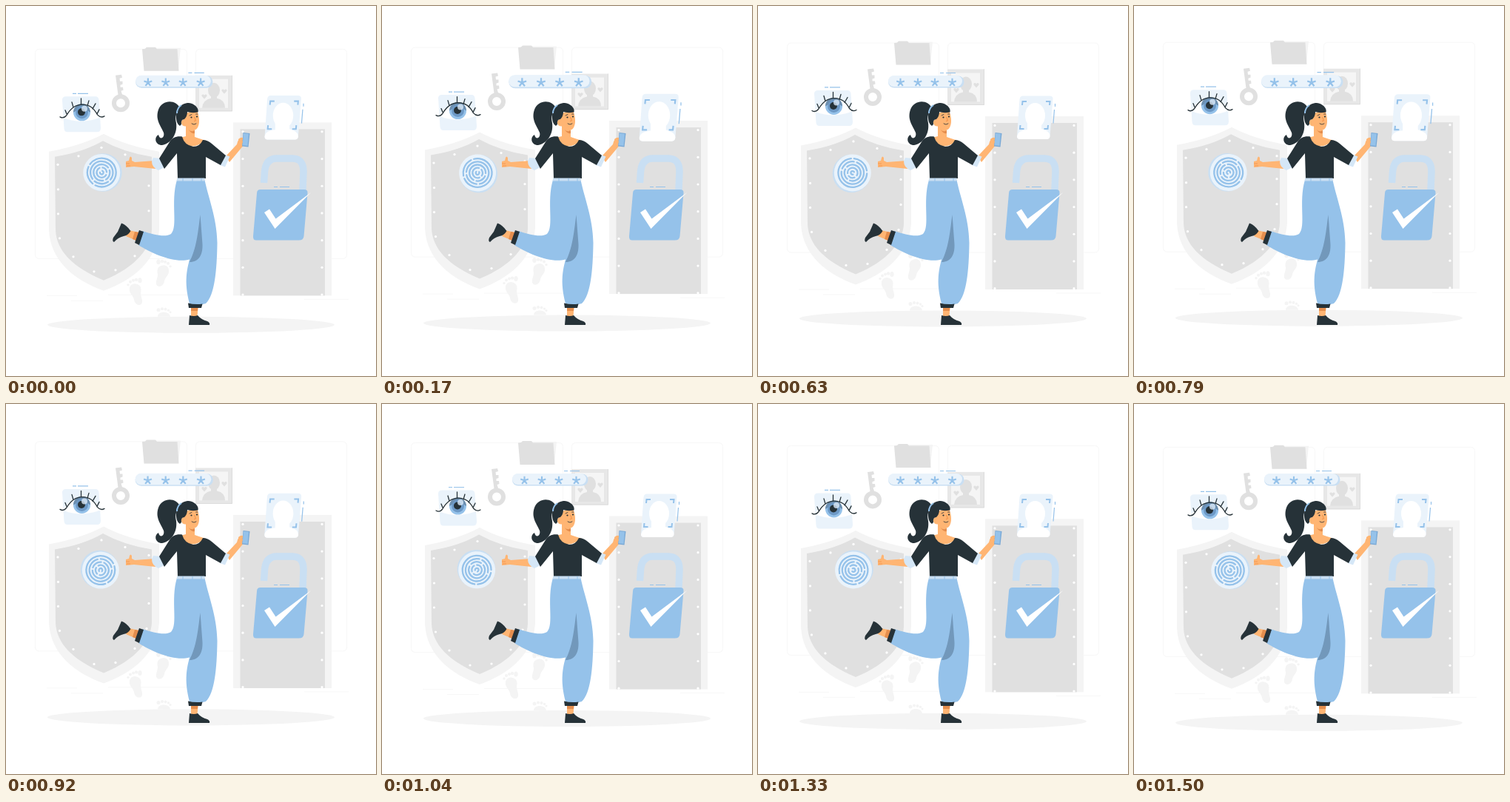
An HTML page for the animation above (1.54 s loop, 500 by 500 pixels).

```html
<!DOCTYPE html>
<html lang="en">
<head>
<meta charset="utf-8">
<title>Secure login</title>
<style>
  html, body { margin: 0; width: 100%; height: 100%; overflow: hidden; background: #fff; }
  svg { display: block; width: 100%; height: 100%; }
  .pale { fill: #f4f4f4; }
  .grey { fill: #e0e0e0; }
  .ice { fill: #eaf3fb; }
  .cuff { fill: #d5e7f7; }
  .sky { fill: #c9dff3; }
  .blue { fill: #95c2ea; }
  .dark { fill: #263238; }
  .skin { fill: #ffb573; }
  .white { fill: #fff; }
  .line { fill: none; stroke: #95c2ea; stroke-width: 1.2; }
  .ink { fill: none; stroke: #263238; stroke-linecap: round; }
</style>
</head>
<body>
<svg viewBox="0 0 500 500">
  <defs>
    <g id="foot">
      <path d="M-7 2C-8-5-3-9 3-7C9-5 9 0 8 5C8 10 12 16 9 20C5 23 0 20-1 14C-2 9-6 7-7 2Z"/>
      <circle cx="-9" cy="-6" r="1.7"/><circle cx="-6" cy="-10" r="2"/>
      <circle cx="-2" cy="-12" r="2"/><circle cx="2" cy="-13" r="2.2"/>
      <ellipse cx="7" cy="-12" rx="2.7" ry="3.5"/>
    </g>
    <path id="heart" d="M0 4L-3.5 0C-4-3-1-3 0-1C1-3 4-3 3.5 0Z"/>
    <path id="star" d="M0 0V-5.6M0 0L5.3-1.7M0 0L3.3 4.5M0 0L-3.3 4.5M0 0L-5.3-1.7"/>
  </defs>

  <g id="scene">
    <g fill="none" stroke="#f7f7f7">
      <rect x="39.5" y="58.5" width="205" height="283" rx="5"/>
      <rect x="256.5" y="58.5" width="204" height="283" rx="5"/>
      <path d="M55 391.5H96M88 398.5H131M138 390.5H250M403 396.5H463"/>
    </g>
    <ellipse class="pale" cx="250" cy="431" rx="194" ry="11"/>

    <path class="pale" d="M187 60L189 57H236L233 86Z"/>
    <path class="grey" d="M184 58.5L188 58L190 56H202L204 58.5H231.5L233.5 88H186.5Z"/>

    <circle cx="155" cy="131.5" r="9" fill="none" stroke="#e0e0e0" stroke-width="6"/>
    <path class="grey" d="M148 94L156 93L157 97L153.5 98L154 102L157.500 102V106L154.500 107V110L158 110L158.5 114L155.5 115L158 123L152 124Z"/>

    <rect x="256" y="94" width="50" height="48.5" fill="#e7e7e7"/>
    <rect x="261" y="99" width="39" height="39" fill="#f5f5f5"/>
    <path d="M305.5 94V142H256" fill="none" stroke="#dcdcdc"/>
    <g class="grey">
      <ellipse cx="281" cy="114" rx="8" ry="10"/>
      <path d="M277 120H285V125Q296 127 296 138H265Q266 127 277 125Z"/>
      <use href="#heart" x="268" y="122"/><use href="#heart" x="295" y="115"/>
    </g>

    <path class="pale" d="M58 197Q102 189 132 173Q162 189 207 197V303C204 345 171 371 132 385C93 371 60 345 58 303Z"/>
    <path class="grey" d="M66 204Q104 198 131 182.5Q159 198 197 204V303C196 327 176 353 132 371C89 353 68 330 67 303Z"/>
    <rect class="pale" x="307" y="157.5" width="133" height="234"/>
    <rect class="grey" x="316.5" y="166.5" width="114.5" height="225"/>
    <g id="rivets" class="white"></g>

    <g class="pale">
      <use href="#foot" transform="translate(174 383)"/>
      <use href="#foot" transform="matrix(-1 0 0 1 213 358)"/>
      <path d="M205 420C205 412 221 412 222 420Z"/>
      <circle cx="206" cy="411" r="2.5"/><circle cx="211" cy="409.5" r="2"/>
      <circle cx="215.5" cy="410" r="2"/><circle cx="219.5" cy="411.5" r="1.7"/>
      <circle cx="222" cy="414" r="1.5"/>
    </g>

    <path class="ice" d="M81 122.5H121Q125 122.5 125.5 127L128 165Q128 170.5 123 170.5H83Q79 170.5 78.5 166L76 127Q76 122.5 81 122.5Z"/>
    <path class="white" d="M77 151C89 129 115 128 129 150Q119 155 103 156Q88 156 77 151Z"/>
    <circle class="blue" cx="102.5" cy="144" r="11.5"/>
    <path d="M91 144A11.5 11.5 0 0 1 114 144Q103 136 91 144Z" fill="#6c8eae"/>
    <circle cx="102.500" cy="144" r="8.500" fill="#6d99c6"/>
    <circle class="dark" cx="102" cy="143.5" r="5"/>
    <circle cx="106" cy="139" r="4" fill="#dceaf7" opacity=".8"/>
    <path class="ink" stroke-width="1.3" d="M73 150Q78 153 82 147.500C93 128.500 114 128.500 123.500 147Q128 152 133 149M82 146L80 141M91 137L89 130M101.500 133V125M110 135L112 128M117 139L121 132M123 146L126 140"/>
    <path class="line" d="M90 118.500H95M97 118.500H111"/>
  </g>

  <g id="print">
    <circle class="sky" cx="1.700" r="25.700"/>
    <circle class="ice" r="25"/>
    <g id="ridges" class="line" style="stroke-width:2.3" stroke-linecap="round"></g>
  </g>

  <g id="password">
    <rect class="sky" x="176" y="94.5" width="102.500" height="16" rx="8"/>
    <rect class="ice" x="176" y="94" width="100" height="15" rx="7.5"/>
    <g class="line" style="stroke-width:2.1">
      <use href="#star" x="192.5" y="103.3"/><use href="#star" x="216" y="103.3"/>
      <use href="#star" x="239" y="103.3"/><use href="#star" x="262.5" y="103.3"/>
    </g>
    <path class="line" d="M246 90.5H251M254 90.5H267"/>
  </g>

  <g id="face">
    <path class="ice" d="M358 121.5H394Q399 121.5 398.5 126L394.5 176Q394 180 390 180H354Q350 180 350 176L353.5 126Q354 121.5 358 121.5Z"/>
    <ellipse class="white" cx="374.5" cy="148" rx="13.5" ry="17"/>
    <path class="white" d="M364 158H383V166Q395 169 394.5 176Q394 180 390 180H354Q350 180 350 176Q351 168 364 167Z"/>
    <path class="line" style="stroke-width:2" d="M357 134L357.5 129H363M389 129H394.5L394 134M354.5 161L354 166H359.5M386.5 166H391.5L392 161"/>
    <path class="line" d="M401.5 132V136M400.5 140L399 158.5"/>
  </g>

  <g id="lock">
    <path d="M348.5 239L349.5 224Q351 206 366 206H387Q402 206 402 224L401 248" fill="none" stroke="#c9dff3" stroke-width="9.5"/>
    <path class="blue" d="M344 248H403Q408 248 407.5 253L402.5 311Q402 316.5 396 316.5H338Q333.5 316.5 334 311L339 253Q339 248 344 248Z"/>
    <path class="white" d="M349 279L356 274.500L364.500 287.5L412 252L363.500 301Z"/>
    <path class="line" d="M362 244.5H367M370 244.5H383"/>
  </g>

  <g id="woman">
    <path class="dark" d="M235 138C230 126 211 126 206 140C201 154 210 163 213 171C215 178 208 182 206 174C200 177 201 188 211 188C223 186 232 173 230 158C228 150 230 144 235 139Z"/>
    <path class="skin" d="M243 160V176L235 178Q245 199 270 182L255 177V164Z"/>
    <path d="M247 167Q250 171 255 168V172Q250 173 247 167Z" fill="#e58e4e"/>
    <path class="skin" d="M238 146L258 141C262 151 262 160 258.500 165C255 170 247 167 243 162.500C236 163 235 154 240 153Z"/>
    <path class="dark" d="M231 157C227 141 236 131 247 131C255 132 261 138 259.500 143.500Q251 145 245 143Q245 149 241 153Q236 153 237 160L235 162Q232 160 231 157Z"/>
    <path d="M231 145Q231 138 237 134" fill="none" stroke="#95c2ea" stroke-width="2"/>
    <g class="dark"><circle cx="250.5" cy="150.5" r="1.100"/><circle cx="258" cy="149.5" r="1.100"/></g>
    <path class="ink" stroke-width=".8" d="M248 148L251 146.5M256.500 146L259 146M251 159Q254 161.500 257 159"/>
    <path d="M254.500 150L256.500 155L254 155.500" fill="none" stroke="#ed893e" stroke-width=".8"/>

    <path class="skin" d="M201 209L174 211L170 209V205Q168 202 167 205L166 209L162 210V218L173 217L202 220Z"/>
    <path d="M162 213H167M163 216H168" stroke="#ed893e" stroke-width=".6"/>
    <path class="cuff" d="M199 205L209 206L214 218L206 222Q197 218 197 210Z"/>
    <path class="skin" d="M297 203L312 187Q313 179 320 178L322 187L302 211Z"/>
    <path d="M320.5 171L329.5 172L327.5 190.5L319 189.5Z" fill="#79a8d5"/>
    <path class="blue" d="M321 172L328 172.700L326.500 189L319.500 188.300Z"/>
    <path class="skin" d="M314 180Q317 177 320 178V180L317 182L320 183L319 186L316 190Z"/>
    <path class="cuff" d="M296 201L302.5 203.5L296 217.5L289 215Z"/>
    <path class="dark" d="M238 176.5C230 175.500 225 178 221.500 183L207 206L214 220L231 199L232 233H270V204L290 215L297 202L278 186Q272 181 266 181Q262 190 253 190Q241 188 238 176.5Z"/>

    <path class="skin" d="M166 303L180 306L176 317L162 311Z"/>
    <path d="M174 305L180 306L176 317L171 315Z" fill="#e58e4e"/>
    <path class="dark" d="M156 293.5Q163 296 168.5 304Q165 310 159 311Q151 313 146 319Q143 318 145 313L151 305Z"/>
    <path class="blue" d="M231 235H268.500C273 258 285 286 285.500 320C285 357 282 391 270 402Q260 405 248 402C240 372 245 355 248 342.500C228 348 198 335 179 323L184 304C200 309 215 313 223 308C233 298 222 265 231 235Z"/>
    <path d="M262.5 282C259 310 257 328 248 346C261 346 266 336 265.5 322Z" fill="#7298bb"/>
    <path class="sky" d="M231.500 232.5H268.500L269 236.5H230.500Z"/>
    <path d="M239 233V237M252 233V237M264 233V237" stroke="#95c2ea"/>
    <path class="dark" d="M180 303L186 305L180 323L174 320Z"/>
    <path class="skin" d="M250 406H259.5L258.5 420H250Z"/>
    <path d="M250 407H259.5L259 412H250Z" fill="#e58e4e"/>
    <path class="dark" d="M246 401.5Q256 404 265.5 402.5L264 408H247Z"/>
    <path class="dark" d="M248 418Q254 420 259 418Q264 424 272 426Q276 428 275 431H247Z"/>
  </g>
</svg>
<script>
  const LOOP = 1540, FLOAT = 1500;
  const $ = id => document.getElementById(id);

  const shieldRivets = [[129, 191.5], [98, 203], [70, 214.5], [70.5, 248], [70.5, 281], [72.5, 314], [91, 339],
    [119, 359], [148, 357], [174, 338], [190, 311], [193, 277], [193, 243], [193, 212], [161, 201]];
  const doorRivets = [...Array(14).keys()].map(i => [i % 2 ? 427 : 320, 170 + 36.7 * (i >> 1)]);
  $('rivets').innerHTML = [...shieldRivets, ...doorRivets]
    .map(([x, y]) => `<circle cx="${x}" cy="${y}" r="1.6"/>`).join('');

  $('ridges').innerHTML = [2.4, 6.8, 11, 15.2, 19.4].map((r, i) =>
    `<circle r="${r}" stroke-dasharray="${r * 2.4} 4 ${r * 1.3} 4" transform="rotate(${i * 77 + 30})"/>`).join('');

  // Linear rise and fall around a peak, wrapping with the loop
  function pulse(t, peak, half) {
    const d = Math.abs(t - peak);
    return Math.max(0, 1 - Math.min(d, LOOP - d) / half);
  }

  const scaleAt = (id, x, y, s) =>
    $(id).setAttribute('transform', `translate(${x} ${y}) scale(${s}) translate(${-x} ${-y})`);

  function draw(now) {
    const t = now % LOOP;
    const phase = ((t + 10) % FLOAT) / FLOAT;
    const lift = 10 * (1 - Math.abs(1 - 2 * phase));
    $('scene').setAttribute('transform', `translate(0 ${-lift})`);

    $('print').setAttribute('transform', `translate(128.5 225) rotate(${360 * t / LOOP}) translate(.8 0)`);

    const beat = 1 + .1 * pulse(t, 190, 230) + .085 * pulse(t, 805, 170);
    scaleAt('password', 227, 102.5, beat);
    scaleAt('face', 374.5, 151, beat);
  }

  const start = performance.now();
  function tick() {
    draw(performance.now() - start);
    requestAnimationFrame(tick);
  }
  tick();
</script>
</body>
</html>
```
